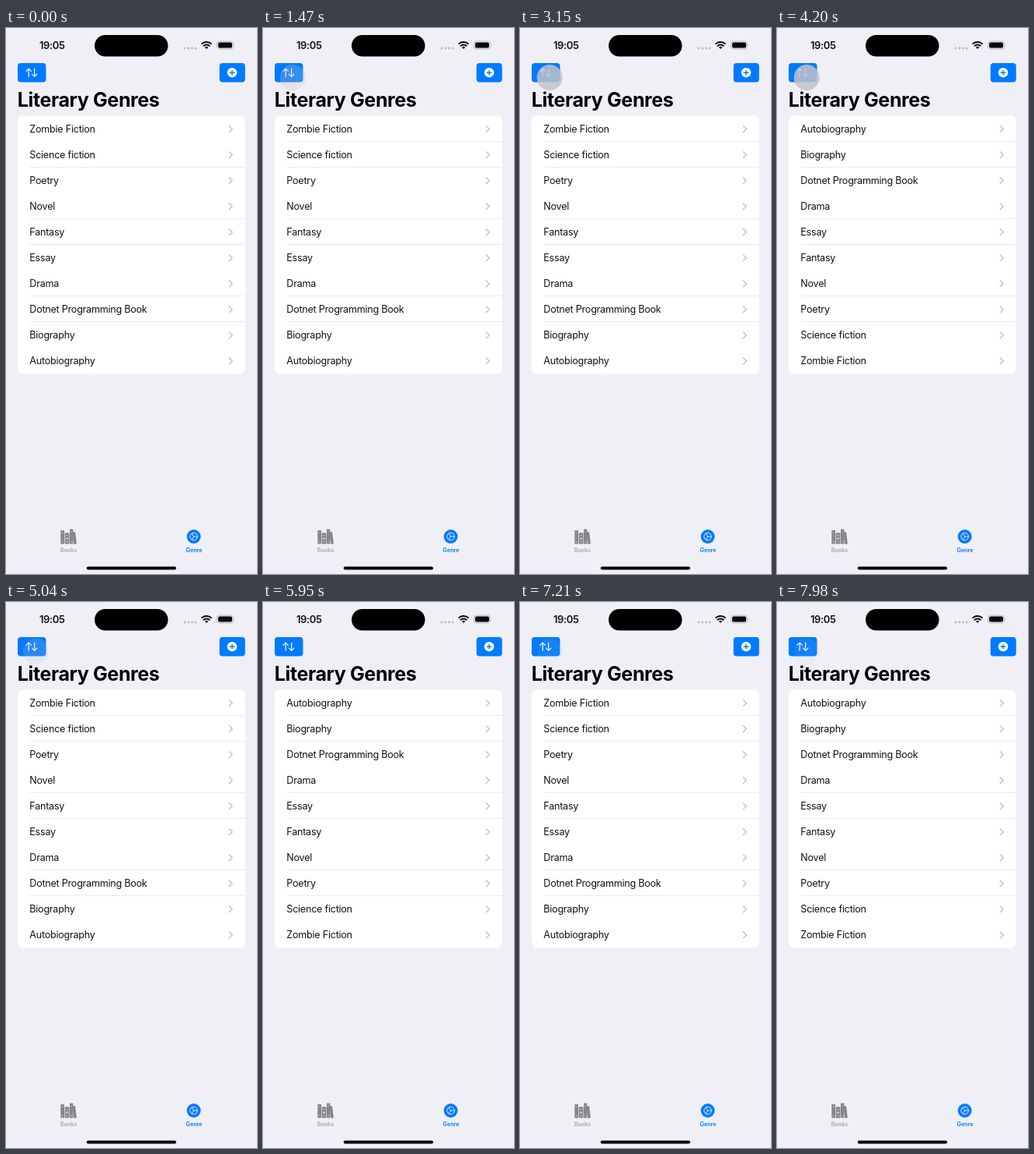
An HTML page that plays this animation: 323x700 px, repeating every 8 s.

```html
<!DOCTYPE html>
<html lang="en">
<head>
<meta charset="utf-8">
<title>Literary Genres</title>
<style>
html, body { margin: 0; width: 100%; height: 100%; overflow: hidden; background: #f0eff5; }
svg { display: block; width: 100%; height: 100%; font-family: Inter, "Open Sans", sans-serif; filter: blur(.3px); }
.row { font-size: 12.6px; letter-spacing: -.25px; fill: #111; }
.line { stroke: #ebebed; stroke-width: 1; }
.chevron { fill: none; stroke: #bdbdc1; stroke-width: 1.3; stroke-linecap: round; stroke-linejoin: round; }
.tab { font-size: 7.3px; font-weight: 600; text-anchor: middle; letter-spacing: -.05px; }
.thin { fill: none; stroke-linecap: round; stroke-linejoin: round; }
</style>
</head>
<body>
<svg viewBox="0 0 323 700">
  <rect width="323" height="700" fill="#f0eff5"/>

  <text x="43" y="27" font-size="13" font-weight="600" letter-spacing="-.4" fill="#111">19:05</text>
  <rect x="114" y="9" width="94.5" height="27.5" rx="13.75"/>
  <g fill="#b9b9be">
    <circle cx="230" cy="26" r="1.4"/><circle cx="234.8" cy="26" r="1.4"/>
    <circle cx="239.4" cy="26" r="1.4"/><circle cx="244" cy="26" r="1.4"/>
  </g>
  <g class="thin" stroke="#0a0a0a" stroke-width="2" style="stroke-linecap:butt">
    <path d="M251.6 20.6a9.2 9.2 0 0 1 13 0M253.9 23.3a6 6 0 0 1 8.4 0"/>
    <path d="M258.1 27l-2.2-2.3a3.2 3.2 0 0 1 4.4 0z" fill="#0a0a0a" stroke="none"/>
  </g>
  <rect x="271.4" y="17" width="21.2" height="10" rx="3.2" fill="#e4e4e8" stroke="#b4b4ba" stroke-width=".8"/>
  <rect x="273" y="18.4" width="18" height="7.2" rx="2" fill="#0a0a0a"/>
  <path d="M293.8 20.3q1.5 1.7 0 3.4z" fill="#b4b4ba"/>

  <g fill="#007aff">
    <rect x="15" y="45" width="36.5" height="24.5" rx="4"/>
    <rect x="274.7" y="45" width="33" height="24.5" rx="4"/>
  </g>
  <path class="thin" stroke="#fff" stroke-width="1.2"
    d="M29.2 62.3V52.2M26 55.4l3.2-3.2 3.2 3.2M36.7 52.2v10.1M33.5 59.1l3.2 3.2 3.2-3.2"/>
  <circle cx="291" cy="57.2" r="6.2" fill="#fff"/>
  <path class="thin" stroke="#007aff" stroke-width="1.4" d="M288.2 57.2h5.6M291 54.4v5.6"/>

  <text x="14.8" y="101" font-size="25" font-weight="700" letter-spacing="-.38">Literary Genres</text>
  <rect x="15" y="112.5" width="292.7" height="331" rx="6.5" fill="#fff"/>
  <g id="list"></g>

  <g fill="#85858a">
    <rect x="70.3" y="644" width="4.8" height="17.5" rx=".8"/>
    <rect x="75.8" y="647.2" width="5.6" height="14.3" rx=".8"/>
    <rect x="82" y="642.4" width="4.4" height="19.1" rx=".8"/>
    <rect x="86.4" y="646" width="3.6" height="15.6" rx=".8" transform="rotate(-7 88 654)"/>
    <path d="M71.4 647h2.6M71.4 658.5h2.6M77 650.5h3.2M77 658.7h3.2M83 646h2.4M83 658.5h2.4" stroke="#c4c4c9" stroke-width=".8"/>
    <circle cx="78.6" cy="654.6" r="1.4" fill="#d4d4d9"/>
  </g>
  <text class="tab" x="80.5" y="672" fill="#a8a8ad">Books</text>
  <circle cx="241.6" cy="652" r="9" fill="#007aff"/>
  <g class="thin" stroke="#e0edff" stroke-width="1">
    <circle cx="241.6" cy="652" r="4.8"/>
    <path d="M239.4 648.3l2.2 3.7h4.2M241.6 652l-2.2 3.7"/>
  </g>
  <text class="tab" x="242" y="672" fill="#007aff">Genre</text>
  <rect x="103.7" y="690.5" width="115.3" height="4" rx="2"/>

  <circle id="touch" cx="38.2" cy="63.5" r="16.4" fill="#c3c3c7" fill-opacity=".83" stroke="#b4b4b9" stroke-opacity=".4" stroke-width=".6" opacity="0"/>
</svg>
<script>
const NS = "http://www.w3.org/2000/svg";
const LOOP = 8000, STEP = 70;
const genres = ["Autobiography", "Biography", "Dotnet Programming Book", "Drama", "Essay",
  "Fantasy", "Novel", "Poetry", "Science fiction", "Zombie Fiction"];
const reversed = [...genres].reverse();
const rules = [0, 1, 3, 4, 6, 7];

// Moments when the sort order flips; the loop opens in descending order.
const flips = [2030, 2940, 3990, 4760, 5600, 6860, 7630];
// Touch marker opacity: [time, value]
const fade = [[0, 0], [1400, 0], [1610, 1], [2200, 1], [2480, 0], [2560, 0], [2730, 1],
  [3160, 1], [3440, 0], [3560, 0], [3730, 1], [4210, 1], [4410, 0], [4480, 0], [4620, 1],
  [4830, 1], [5110, 0], [5180, 0], [5390, 1], [5640, 1], [5920, 0], [6160, 0], [6370, 1],
  [6930, 1], [7210, .12], [7280, 0], [7350, 0], [7490, 1], [7700, 1], [7980, .12], [8000, .1]];

const list = document.getElementById("list");
const touch = document.getElementById("touch");

function add(tag, attrs) {
  const el = document.createElementNS(NS, tag);
  for (const key in attrs) el.setAttribute(key, attrs[key]);
  return list.appendChild(el);
}

const rowY = i => 129.5 + 33.05 * i;
const lines = rules.map(i => {
  const y = Math.floor(rowY(i) + 16) + .5;
  return add("path", { class: "line", d: `M30.5 ${y}H307.7` });
});
const labels = genres.map((_, i) => {
  const y = rowY(i);
  add("path", { class: "chevron", d: `M287.2 ${y - 3.9}l4.1 3.9-4.1 3.9` });
  return add("text", { class: "row", x: 30.3, y: y + 4.5 });
});

function sample(keys, t) {
  const i = keys.findIndex(k => k[0] > t);
  if (i < 1) return keys[keys.length - 1][1];
  const [t0, a] = keys[i - 1], [t1, b] = keys[i];
  return a + (b - a) * (t - t0) / (t1 - t0);
}

let order;
function draw(now) {
  const t = Math.floor(now % LOOP / STEP) * STEP;
  const next = flips.filter(f => f <= t).length % 2 ? genres : reversed;
  if (next !== order) {
    order = next;
    labels.forEach((el, i) => { el.textContent = order[i]; });
  }
  lines[0].setAttribute("opacity", t < 1470 ? 0 : 1);
  touch.setAttribute("opacity", sample(fade, t));
}

const start = performance.now();
function tick() {
  draw(performance.now() - start);
  requestAnimationFrame(tick);
}
tick();
</script>
</body>
</html>
```
